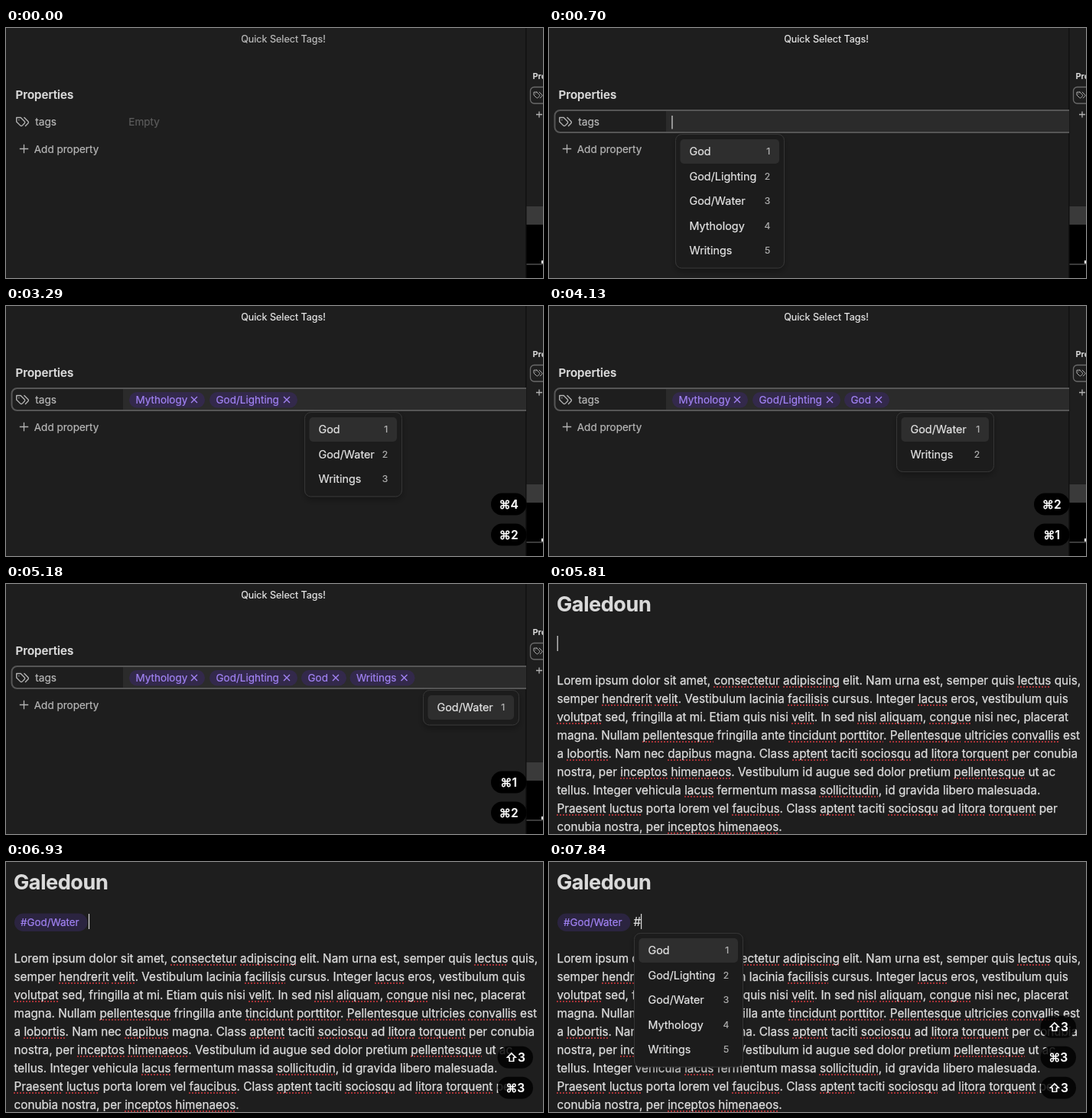
Recreate the animation shown at these times as an HTML page. Size 702 by 328 pixels, loop 8000 ms.

```html
<!DOCTYPE html>
<html lang="en">
<head>
<meta charset="utf-8">
<title>Quick Select Tags</title>
<style>
  html, body { margin: 0; width: 100%; height: 100%; overflow: hidden; background: #1e1e1e; }
  body, svg { font-family: Inter, "DejaVu Sans", sans-serif; }
  svg { position: absolute; left: 0; top: 0; }
  text { white-space: pre; stroke-width: .2px; }
  #note {
    position: absolute; left: 10.5px; top: 114.5px; white-space: pre;
    font-size: 15.3px; line-height: 24px; color: #dedede; -webkit-text-stroke: .25px #dedede;
  }
  #note u {
    text-decoration: underline dotted #a93237 1.5px;
    text-underline-offset: 2.5px; text-decoration-skip-ink: none;
  }
</style>
</head>
<body>
<div id="note"></div>
<svg id="stage" width="702" height="328" viewBox="0 0 702 328">
  <defs>
    <filter id="shadow" x="-20%" y="-20%" width="140%" height="150%">
      <feDropShadow dx="0" dy="4" stdDeviation="4" flood-color="#000" flood-opacity=".3"/>
    </filter>
    <clipPath id="pane"><rect width="680" height="328"/></clipPath>
    <g id="tagsIcon" fill="none" stroke="#b3b3b3" stroke-width="1.8" stroke-linecap="round" stroke-linejoin="round">
      <path d="M9 5H2v7l6.3 6.3c.9.9 2.5.9 3.4 0l3.6-3.6c.9-.9.9-2.5 0-3.4L9 5ZM6 9V9.01M15 5l6.3 6.3a2.4 2.4 0 0 1 0 3.4L17 19"/>
    </g>
  </defs>
</svg>
<script>
const LOOP = 8000, CUT = 5390;
const stage = document.getElementById('stage');
const note = document.getElementById('note');
const parts = [];

// Adds markup that is visible from one time to another.
function show(from, to, markup) {
  const el = document.createElementNS('http://www.w3.org/2000/svg', 'g');
  el.innerHTML = markup;
  stage.append(el);
  const part = { el, from, to };
  parts.push(part);
  return part;
}

const text = (x, y, size, fill, str, extra = '') =>
  `<text x="${x}" y="${y}" font-size="${size}" fill="${fill}" stroke="${fill}" ${extra}>${str}</text>`;
const rect = (x, y, w, h, fill, rx = 0, extra = '') =>
  `<rect x="${x}" y="${y}" width="${w}" height="${h}" rx="${rx}" fill="${fill}" ${extra}/>`;
const plus = (x, y, r) =>
  `<path d="M${x - r} ${y}h${2 * r}M${x} ${y - r}v${2 * r}" stroke="#b3b3b3" stroke-width="1.3"/>`;
const caret = (x, y, h) => rect(x - .6, y, 1.2, h, '#dadada');

function menu(x, y, w, items) {
  const rows = items.map((name, i) => {
    const base = y + 28.2 + i * 32.5;
    return text(x + 18.5, base, 14.4, '#e4e4e4', name) +
      text(x + w - 18.7, base - .8, 12.2, '#b4b4b4', i + 1, 'text-anchor="end"');
  });
  return rect(x + .5, y + .5, w - 1, items.length * 32.5 + 13, '#1f1f1f', 8,
      'stroke="#363636" filter="url(#shadow)"') +
    rect(x + 6.5, y + 7, w - 13.5, 32, '#2e2e2e', 5) + rows.join('');
}

function pill(x, w, name) {
  const cx = x + w - 14;
  return rect(x, 113, w, 20.5, '#33294b', 10.2) +
    text(x + 8.5, 128, 13.5, '#a283f5', name) +
    `<path d="M${cx - 4} 119l8 8m0-8l-8 8" stroke="#a283f5" stroke-width="1.4"/>`;
}

// Properties pane
show(0, CUT,
  rect(0, 0, 702, 328, '#1e1e1e') +
  rect(680, 234, 22, 24, '#3a3a3a') + rect(680, 258, 22, 70, '#000') +
  rect(680, 309.5, 22, 1, '#777') + rect(700, 305, 2, 4, '#fff') +
  rect(679, 0, 1.5, 328, '#111') +
  text(688.5, 67, 11, '#dcdcdc', 'Properties', 'font-weight="600"') +
  rect(685.5, 77.5, 40, 21.5, 'none', 5, 'stroke="#6a6a6a" stroke-width="1.3"') +
  '<use href="#tagsIcon" transform="translate(688.9 81.4) scale(.55)"/>' + plus(697, 113.5, 4) +
  text(12.5, 93.2, 15.1, '#dcdcdc', 'Properties', 'font-weight="600"') +
  plus(23.5, 158.5, 5.7) + text(36.8, 163.6, 13.5, '#b8b8b8', 'Add property'));
const heading = fill => text(362.5, 18.5, 12.6, fill, 'Quick Select Tags!', 'text-anchor="middle"');
show(0, 630, heading('#bdbdbd') + text(160.3, 128, 13.5, '#5c5c5c', 'Empty'));
show(630, CUT, heading('#e8e8e8') +
  `<g clip-path="url(#pane)">${rect(153, 109, 540, 28, '#2b2b2b')}
   ${rect(7.5, 108, 700, 29, 'none', 7, 'stroke="#565656" stroke-width="2"')}</g>`);
show(0, CUT, '<use href="#tagsIcon" transform="translate(12.2 113.6) scale(.78)"/>' +
  text(38.2, 128, 13.7, '#b8b8b8', 'tags'));

const TAGS = ['God', 'God/Lighting', 'God/Water', 'Mythology', 'Writings'];
// Each step: start, caret off, caret x, menu width, then the tag picked at the end.
const steps = [
  [630, 1120, 161, 143, 'Mythology', 99],
  [1680, 2240, 266, 143, 'God/Lighting', 115],
  [2730, 3290, 386, 128, 'God', 59],
  [3570, 4130, 449.5, 128, 'Writings', 85],
  [4620, 5180, 541, 126],
];
let left = TAGS;
steps.forEach(([from, off, x, w, pick, pickWidth], i) => {
  const to = i + 1 < steps.length ? steps[i + 1][0] : CUT;
  show(from, off, caret(x, 115, 17.5));
  show(from, to, menu(Math.round(x) + 4, 139, w, left));
  if (pick) show(to, CUT, pill(x, pickWidth, pick));
  left = left.filter(name => name !== pick);
});

// Note
const misspelt = new RegExp('\\b(' + ('consectetur adipiscing lectus hendrerit velit facilisis lacus volutpat ' +
  'nisl aliquam congue pellentesque tincidunt porttitor ultricies convallis lobortis dapibus aptent sociosqu ' +
  'litora torquent inceptos himenaeos sollicitudin praesent luctus faucibus').replace(/ /g, '|') + ')\\b', 'gi');
note.innerHTML = `Lorem ipsum dolor sit amet, consectetur adipiscing elit. Nam urna est, semper quis lectus quis,
semper hendrerit velit. Vestibulum lacinia facilisis cursus. Integer lacus eros, vestibulum quis
volutpat sed, fringilla at mi. Etiam quis nisi velit. In sed nisl aliquam, congue nisi nec, placerat
magna. Nullam pellentesque fringilla ante tincidunt porttitor. Pellentesque ultricies convallis est
a lobortis. Nam nec dapibus magna. Class aptent taciti sociosqu ad litora torquent per conubia
nostra, per inceptos himenaeos. Vestibulum id augue sed dolor pretium pellentesque ut ac
tellus. Integer vehicula lacus fermentum massa sollicitudin, id gravida libero malesuada.
Praesent luctus porta lorem vel faucibus. Class aptent taciti sociosqu ad litora torquent per
conubia nostra, per inceptos himenaeos.`.replace(misspelt, '<u>$1</u>');

show(CUT, LOOP, text(10, 35.5, 27, '#dadada', 'Galedoun', 'font-weight="700" letter-spacing="-.4"'));
show(5600, 5950, caret(11.2, 68, 20));
show(5950, 6860, text(10.5, 94, 27, '#6c6c6c', '#', 'font-weight="700"') + menu(11, 105, 143, TAGS));
show(5950, 6440, caret(29, 67, 32));
show(6860, LOOP, rect(11, 67.5, 95.5, 23.5, '#2b2440', 11.7) + text(19, 84, 13.4, '#a283f5', '#God/Water'));
show(6860, 7420, caret(108.5, 68, 20));
show(7630, LOOP, text(110.5, 84.3, 15.3, '#dedede', '#') + caret(120.6, 68, 20) + menu(111, 93, 143, TAGS));

// Key badges: the newest sits lowest, older ones move up and fade.
const HOLD = 2100, FADE = 350;
const badge = (from, end, x, y, alpha, keys) => Object.assign(
  show(from, Math.min(end, from + HOLD + FADE),
    rect(x, y - 14.5, 46.5, 29, '#000', 14.5, `fill-opacity="${alpha}"`) +
    text(x + 23.2, y + 5.5, 15.5, '#fff', keys, 'text-anchor="middle" font-weight="600"')),
  { end });
const badges = [
  [1680, '⌘4'], [2730, '⌘2'], [3570, '⌘1'], [4620, '⌘2'],
].map(([from, keys]) => badge(from, CUT, 634, 300, 1, keys)).concat([
  [5950, '⇧3'], [6860, '⌘3'], [7630, '⇧3'],
].map(([from, keys]) => badge(from, LOOP, 642.5, 296.3, .82, keys)));

function render(t) {
  for (const p of parts) p.el.style.display = t >= p.from && t < p.to ? '' : 'none';
  for (const b of badges) {
    const newer = badges.filter(o => o.end === b.end && o.from > b.from && o.from <= t).length;
    b.el.setAttribute('transform', `translate(0 ${-40 * newer})`);
    b.el.setAttribute('opacity', Math.max(0, Math.min(1, 1 - (t - b.from - HOLD) / FADE)));
  }
  note.style.display = t < CUT ? 'none' : '';
  note.style.transform = t >= 5950 && t < 6860 ? 'translateY(11px)' : '';
}

const start = performance.now();
function tick() {
  render((performance.now() - start) % LOOP);
  requestAnimationFrame(tick);
}
tick();
</script>
</body>
</html>
```
